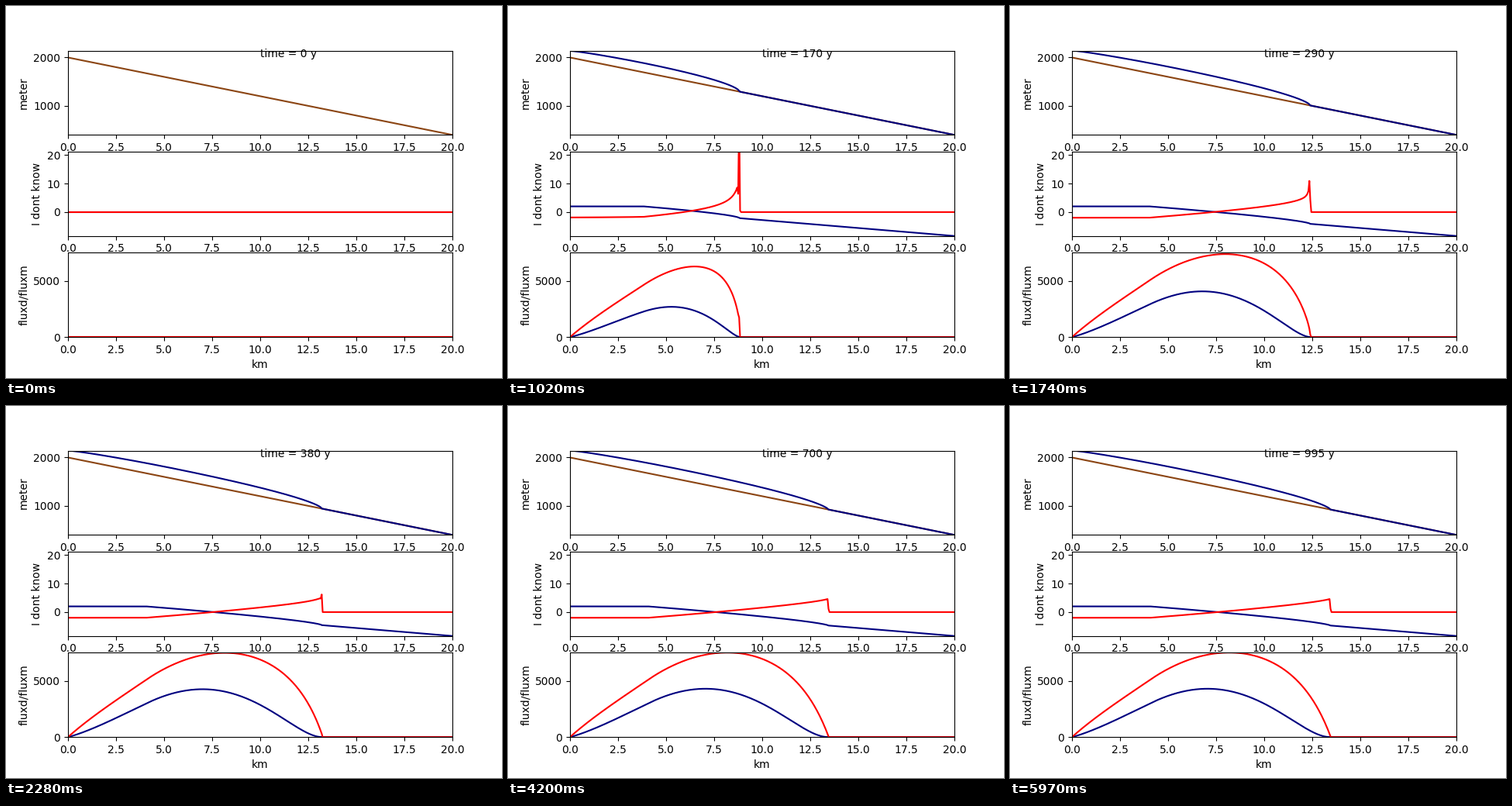
These frames come from a looping animation (640x480 px, 6 s). A matplotlib script:

```python
import numpy as np
import matplotlib.pyplot as plt
from matplotlib.animation import FuncAnimation

# Flowline glacier on a sloping bed, growing from bare ground to steady state.
FRAMES, YEARS = 200, 5
DX, DT = 50.0, 0.1
YEAR = 3.1536e7
RHO_G3 = (917 * 9.81) ** 3
DEFORM = 0.4 * 1.9e-24 * YEAR * RHO_G3
SLIDE = 5.7e-20 * YEAR * RHO_G3
ELA, GRADIENT, MAX_BALANCE = 1600, 0.007, 2

x = np.arange(0, 20000 + DX, DX)
bed = 2000 - 0.08 * x


def balance(h):
    return np.minimum(GRADIENT * (bed[:len(h)] + h - ELA), MAX_BALANCE)


def fluxes(h):
    """Deformation flux, sliding flux and diffusivity at each left cell face."""
    mid = (h[1:] + h[:-1]) / 2
    slope = -np.diff(bed[:len(h)] + h) / DX
    deform, slide = DEFORM * mid ** 5, SLIDE * mid ** 3
    parts = (deform * slope ** 3, slide * slope ** 3,
             3 * (deform + slide) * slope ** 2)
    return [np.append(0.0, p) for p in parts]


def convergence(q):
    return -np.diff(q, append=q[-1]) / DX


def solve(k, r):
    """Symmetric tridiagonal solve of the implicit diffusion step."""
    c = d = 0.0
    cs, ds = [], []
    for left, right, ri in zip(k, k[1:] + [0.0], r):
        m = 1 + left + right - left * c
        d = (ri + left * d) / m
        c = right / m
        cs.append(c)
        ds.append(d)
    out, v = [], 0.0
    for c, d in zip(reversed(cs), reversed(ds)):
        v = d + c * v
        out.append(v)
    return np.array(out[::-1])


def step(h):
    # Only the ice and a margin around its front need solving.
    ice = np.flatnonzero(h)
    n = min(len(h), max(ice[-1] + 6 if len(ice) else 0, 120))
    a = h[:n]
    deform, slide, diff = fluxes(a)
    r = DT * (balance(a) + convergence(deform + slide))
    r = np.maximum(r, -a)
    k = diff * DT / DX ** 2
    h[:n] = np.maximum(a + solve(k.tolist(), r.tolist()), 0)


def simulate():
    h = np.zeros_like(x)
    states = [h.copy()]
    for _ in range(FRAMES - 1):
        for _ in range(round(YEARS / DT)):
            step(h)
        states.append(h.copy())
    return states


states = simulate()
km = x / 1000

fig, axes = plt.subplots(3, 1, figsize=(6.4, 4.8), dpi=100)
limits = [(400, 2142), (-8.4, 21.2), (0, 7525)]
names = ["meter", "I dont know", "fluxd/fluxm"]
for ax, lim, name in zip(axes, limits, names):
    ax.set_xlim(0, 20)
    ax.set_ylim(*lim)
    ax.set_ylabel(name)
axes[2].set_xlabel("km")

axes[0].plot(km, bed, color="saddlebrown")
surface, = axes[0].plot([], [], color="navy")
clock = axes[0].text(10, 2000, "")
gain, = axes[1].plot([], [], color="navy")
inflow, = axes[1].plot([], [], color="red")
deform_line, = axes[2].plot([], [], color="navy")
slide_line, = axes[2].plot([], [], color="red")


def draw(i):
    h = states[i]
    deform, slide, _ = fluxes(h)
    # Nothing is computed yet at time zero: no surface, zero balance.
    surface.set_data(km, bed + h if i else np.full_like(km, np.nan))
    gain.set_data(km, balance(h) if i else 0 * km)
    inflow.set_data(km, convergence(deform + slide))
    deform_line.set_data(km, deform)
    slide_line.set_data(km, slide)
    clock.set_text(f"time = {i * YEARS} y")
    return surface, gain, inflow, deform_line, slide_line, clock


anim = FuncAnimation(fig, draw, frames=FRAMES, interval=30, repeat=True,
                     repeat_delay=0, blit=False)
plt.show()
```
